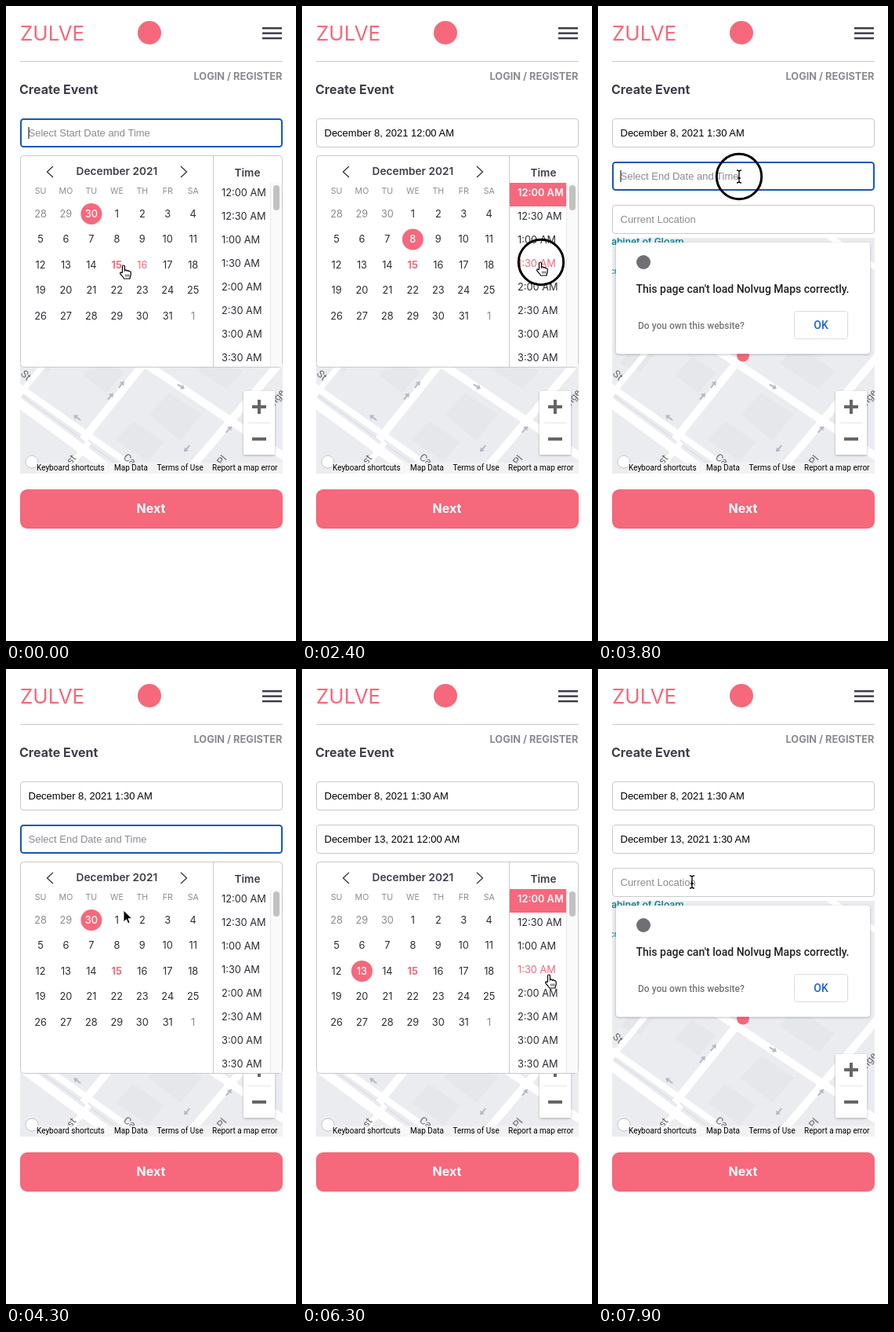
An HTML page for the animation above (8 s loop, 370x808 px).

```html
<!DOCTYPE html>
<html lang="en">
<head>
<meta charset="utf-8">
<title>Create Event</title>
<style>
  html, body { margin: 0; width: 100%; height: 100%; overflow: hidden; background: #fff; }
  svg { display: block; width: 370px; height: 808px; font-family: Inter, sans-serif; }
  .field { font-family: "Liberation Sans", Arial, sans-serif; }
  .map { font-family: Roboto, sans-serif; }
  .mid { text-anchor: middle; }
  .end { text-anchor: end; }
  .w5 { font-weight: 500; }
  .w6 { font-weight: 600; }
  .w7 { font-weight: 700; }
</style>
</head>
<body>
<svg viewBox="0 0 370 808">
  <defs>
    <clipPath id="mapBox"><rect x="18" y="295" width="335" height="300"/></clipPath>
    <clipPath id="listBox"><rect x="265" y="35" width="72" height="234"/></clipPath>
    <filter id="shadow" x="-20%" y="-20%" width="140%" height="140%">
      <feDropShadow dx="0" dy="1" stdDeviation="1.5" flood-opacity=".28"/>
    </filter>
  </defs>
  <g id="page"></g>
  <g id="ui"></g>
</svg>
<script>
const PINK = '#f6687b', DARK = '#3f3d4b', INK = '#2d2b36', GREY = '#8b8a92', LINE = '#c9c9cd';
const LOOP = 8000, STEP = 100;

const text = (x, y, s, size, fill, cls = '', extra = '') =>
  `<text x="${x}" y="${y}" font-size="${size}" fill="${fill}" class="${cls}" ${extra}>${s}</text>`;
const rect = (x, y, w, h, fill, extra = '') =>
  `<rect x="${x}" y="${y}" width="${w}" height="${h}" fill="${fill}" ${extra}/>`;
const path = (d, stroke, width, extra = '') =>
  `<path d="${d}" fill="none" stroke="${stroke}" stroke-width="${width}" ${extra}/>`;
const circle = (x, y, r, fill, extra = '') =>
  `<circle cx="${x}" cy="${y}" r="${r}" fill="${fill}" ${extra}/>`;

function header() {
  return text(18, 44, 'ZULVE', 26, PINK) +
    circle(183, 34, 15, PINK) +
    [27, 33.4, 39.8].map(y => rect(327, y, 25, 2.5, DARK)).join('') +
    rect(18, 70, 335, 1, LINE) +
    text(352.5, 94, 'LOGIN / REGISTER', 12.8, GREY, 'end w7') +
    text(17, 112, 'Create Event', 16, DARK, 'w7');
}

function map() {
  const street = (x, y, angle, s) =>
    text(0, 0, s, 13, '#66676c', 'map', `transform="translate(${x} ${y}) rotate(${angle})"`);
  const arrow = (x, y, angle) =>
    path('M-5 0H2', '#b5b9c4', 2, `transform="translate(${x} ${y}) rotate(${angle})"`) +
    `<path d="M1 -3.6L6 0L1 3.6z" fill="#b5b9c4" transform="translate(${x} ${y}) rotate(${angle})"/>`;
  const blocks = ['M98 470l22 -24 30 20 -22 26z', 'M182 520l26 -28 42 28 -28 32z',
    'M232 455l20 -25 50 34 -20 24z', 'M28 455l10 -12h34l-18 22z', 'M140 552l22 -24 40 27 -21 25z'];
  return `<g clip-path="url(#mapBox)">` + rect(18, 295, 335, 300, '#ebecf0') +
    blocks.map(d => `<path d="${d}" fill="#e5e7eb"/>`).join('') +
    path('M8 478L190 606', '#fff', 8) + path('M2 494L160 610', '#fff', 12) +
    path('M8 487L175 607', '#dfe2e8', 2) +
    path('M146 434L362 578', '#fff', 10) +
    path('M98 552L200 425', '#fff', 10) +
    path('M222 604L368 432', '#fff', 10) +
    path('M10 503L66 435M62 610L106 555M290 290L362 338', '#fff', 7) +
    arrow(91, 524, 216) + arrow(147, 482, -50) + arrow(133, 497, -50) +
    arrow(223, 484, 34) + arrow(231, 563, 130) + arrow(284, 539, -50) +
    street(18, 469, 42, 'St') + street(83, 584, -50, 'st') +
    street(149, 576, 36, 'Ca') + street(343, 509, -52, 'nge') + street(275, 585, -50, 'Pl') +
    text(17, 303.5, 'abinet of Gloam', 13, '#13808e', 'map w5') +
    text(15, 341, 'cr', 11, '#13808e', 'map') +
    circle(185, 444.5, 8, PINK) +
    circle(33, 580, 8, '#fff', 'stroke="#c4c5ca"') +
    rect(38, 581, 315, 14, '#f5f5f5', 'opacity=".7"') +
    [[39, 'Keyboard shortcuts'], [138, 'Map Data'], [192.5, 'Terms of Use'], [263, 'Report a map error']]
      .map(([x, s]) => text(x, 591, s, 10, '#000', 'map')).join('') +
    `</g>` +
    rect(303, 490, 40, 81, '#fff', 'rx="2" filter="url(#shadow)"') +
    path('M314 510h18M323 501v18M314 551h18', '#666', 4) + rect(308, 530, 30, 1, '#e6e6e6');
}

function dialog() {
  return rect(23, 301, 324, 141.5, '#fff', 'rx="4" filter="url(#shadow)"') +
    circle(58, 326, 9, '#6f7073') +
    text(48.5, 365, "This page can't load Nolvug Maps correctly.", 14, '#212121', 'map w5') +
    text(51, 411, 'Do you own this website?', 12, '#757575', 'map w5') +
    rect(250.5, 388.5, 68, 35, '#fff', 'rx="3" stroke="#dadce0"') +
    text(284.5, 411, 'OK', 14, '#1967d2', 'map mid w5');
}

function field(y, value, hint, focused, caret) {
  return (focused
    ? rect(19, y + 1, 333, 35, '#fff', 'rx="3.5" stroke="#1558b8" stroke-width="2"')
    : rect(18.5, y + .5, 334, 36, '#fff', `rx="3.5" stroke="${LINE}"`)) +
    text(28.5, y + 23, value || hint, 13, value ? '#000' : GREY, 'field') +
    (caret ? rect(28.5, y + 11, 1, 15, '#000') : '');
}

// Cell geometry is relative to the popup's top edge.
const dayX = c => 44 + 32.45 * c, dayY = r => 74.3 + 32.45 * r;

function hit(p, top) {
  const y = p.y - top;
  if (p.x > 265 && p.x < 337 && y > 35 && y < 269) return { time: Math.floor((y - 35) / 30) };
  const c = Math.round((p.x - 44) / 32.45), r = Math.round((y - 74.3) / 32.45);
  return c >= 0 && c < 7 && r >= 0 && r < 5 ? { day: r * 7 + c - 2 } : {};
}

function popup(top, picked, hover) {
  let s = rect(18.5, .5, 334, 269, '#fff', `rx="4" stroke="${LINE}"`) +
    path('M60 14L52.5 21 60 28M223 14L230.5 21 223 28', INK, 1.2) +
    text(141.5, 25, 'December 2021', 13.7, DARK, 'mid w6') +
    ['SU', 'MO', 'TU', 'WE', 'TH', 'FR', 'SA']
      .map((d, c) => text(dayX(c), 49, d, 10.6, GREY, 'mid')).join('');
  for (let i = 0; i < 35; i++) {
    const d = i - 2, x = dayX(i % 7), y = dayY(Math.floor(i / 7));
    const label = d < 1 ? d + 30 : d > 31 ? d - 31 : d;
    const outside = d !== label, on = d === picked;
    if (on) s += circle(x, y + .2, 13.5, PINK);
    const fill = d === hover.day || d === 15 ? PINK : on ? '#fff' : outside ? GREY : INK;
    s += text(x, y + 4.7, label, 12.8, fill, 'mid ' + (d === 15 ? 'w7' : on ? 'w5' : ''));
  }
  s += rect(264, 1, 1, 268, LINE) + text(308, 26.5, 'Time', 13.7, DARK, 'mid w6') +
    `<g clip-path="url(#listBox)">`;
  for (let i = 0; i < 8; i++) {
    const on = picked && i === 0;
    if (on) s += rect(265, 35, 72, 30, PINK);
    const label = `${i >> 1 || 12}:${i % 2 ? '30' : '00'} AM`;
    s += text(275, 52 + 30 * i, label, 12.8, on ? '#fff' : hover.time === i ? PINK : INK, on ? 'w6' : '');
  }
  s += `</g>` + rect(337, 35, 15, 234, '#fafafa') + rect(337, 35, 1, 234, '#e8e8e8') +
    rect(341, 38, 8, 32, '#c1c1c1', 'rx="4"');
  return `<g transform="translate(0 ${top})">${s}</g>`;
}

// Pointer path: time, x, y
const track = [
  [-100, 172, 332], [0, 151, 330], [400, 145, 298], [1400, 145, 298], [2200, 305, 326],
  [2700, 305, 326], [3200, 257, 283], [3700, 180, 217], [4000, 180, 217], [4300, 150, 307],
  [4800, 79, 386], [5600, 79, 386], [6200, 316, 389], [7300, 316, 389], [7800, 120, 271], [8000, 120, 271]
];
const clicks = [600, 2300, 3700, 4800, 6800];

function pointer(t) {
  const i = Math.max(1, track.findIndex(k => k[0] >= t));
  const [t0, x0, y0] = track[i - 1], [t1, x1, y1] = track[i];
  const k = (t - t0) / (t1 - t0);
  return { x: x0 + (x1 - x0) * k, y: y0 + (y1 - y0) * k };
}

const HAND = `<path d="M-2.5 9V1.5a1.5 1.5 0 0 1 3 0V6.5c.6-1 2.6-.8 2.8.5c.8-.8 2.4-.4 2.6.7c1-.5 2.3 0 2.3 1.3V12c0 2-1.2 2.5-1.2 5H-.5c0-2-4-4.5-4.8-6.5c-.5-1.5 1-2 2-1z" fill="#fff" stroke="#000" stroke-width="1.2"/>
  <path d="M1.8 11.5v3M3.8 11.5v3M5.8 11.5v3" stroke="#000" stroke-width=".8"/>`;
const ARROW = `<path d="M0 0V15l3.5-3.3 2.3 5 2.4-1-2.2-5H11z" fill="#000" stroke="#fff"/>`;
const BEAM = path('M-3 -8q3 0 3 2V6q0 2-3 2M3 -8q-3 0-3 2M0 6q0 2 3 2M-2 2h4', '#000', 1.3);

function scene(t) {
  const top = t < 2500 ? 190 : t >= 3900 && t < 7000 ? 245 : 0;
  const seen = pointer(t - STEP), p = pointer(t);
  const hover = top ? hit(seen, top) : {};
  const first = t < 800 ? '' : 'December 8, 2021 ' + (t < 2500 ? '12:00 AM' : '1:30 AM');
  const second = t < 5000 ? '' : 'December 13, 2021 ' + (t < 7000 ? '12:00 AM' : '1:30 AM');
  const focus1 = t < 800, focus2 = t >= 3800 && t < 5000;
  const picked = top === 190 ? (first ? 8 : 0) : second ? 13 : 0;

  const overField = [143, 198, 253].some(y => seen.y > y && seen.y < y + 37 && !(top && y > top - 10));
  const shape = 'day' in hover || 'time' in hover ? HAND : overField ? BEAM : ARROW;
  const pressed = clicks.some(c => t >= c && t < c + 200);

  return field(143, first, 'Select Start Date and Time', focus1, focus1 && t % 1000 < 500) +
    field(198, second, 'Select End Date and Time', focus2, focus2 && (t - 3800) % 1000 < 500) +
    (top ? popup(top, picked, hover) : '') +
    `<g transform="translate(${p.x} ${p.y})">${shape}` +
    (pressed ? circle(0, 0, 28.7, 'none', 'stroke="#000" stroke-width="3"') : '') + `</g>`;
}

document.getElementById('page').innerHTML = header() + map() + dialog() +
  field(253, '', 'Current Location') +
  rect(18, 615, 335, 50, PINK, 'rx="9"') + text(185, 645, 'Next', 16, '#fff', 'mid w7');

const ui = document.getElementById('ui'), start = performance.now();
let shown = '';
function tick() {
  const t = (performance.now() - start) % LOOP;
  const next = scene(Math.floor(t / STEP) * STEP);
  if (next !== shown) ui.innerHTML = shown = next;
  requestAnimationFrame(tick);
}
tick();
</script>
</body>
</html>
```
